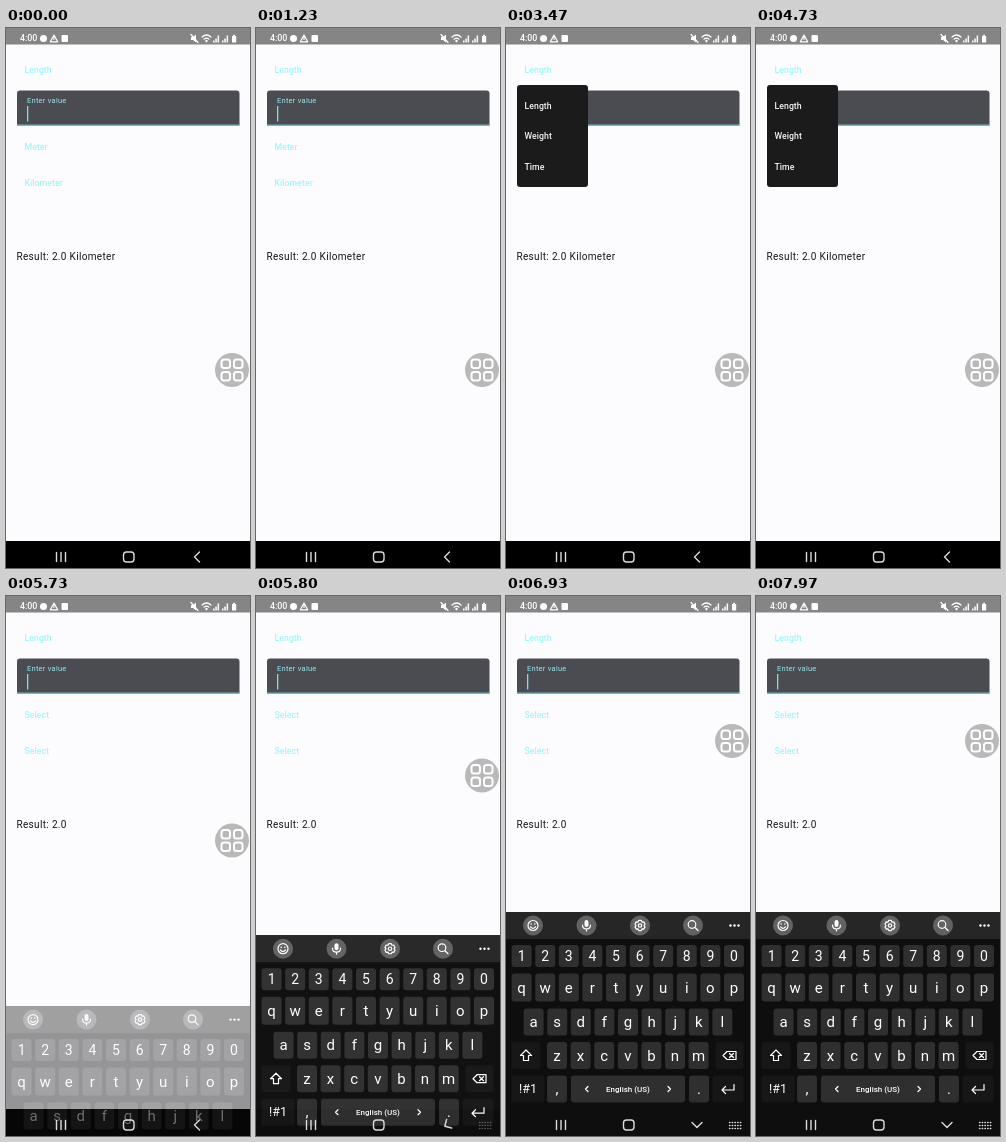
An HTML page that plays this animation: 244x540 px, repeating every 8 s.

```html
<!DOCTYPE html>
<html lang="en">
<head>
<meta charset="utf-8">
<title>Unit converter</title>
<style>
html, body { margin: 0; width: 100%; height: 100%; overflow: hidden; background: #fcfcff; }
svg { display: block; width: 100%; height: 100%; font-family: Roboto, sans-serif; }
.btn { font-size: 8.7px; font-weight: 500; letter-spacing: .06px; fill: #a3f4f8; }
.menu { fill: #f6f6f6; }
.key { fill: #2f2f2f; }
.plain { fill: #171717; }
.mid { text-anchor: middle; fill: #fff; }
.line { fill: none; stroke: #fff; stroke-width: 1.2; stroke-linecap: round; stroke-linejoin: round; }
.nav .line { stroke: #dcdcdc; stroke-width: 1.4; }
</style>
</head>
<body>
<svg viewBox="0 0 244 540">
  <rect width="244" height="540" fill="#fcfcff"/>

  <rect width="244" height="16.5" fill="#858585"/>
  <g fill="#fff">
    <text x="14" y="13.3" font-size="8.8" font-weight="500">4:00</text>
    <circle cx="37.5" cy="10.5" r="3.5"/>
    <path class="line" d="M48 7l3.7 6.8h-7.4zM48 9.5v2"/>
    <rect x="55.5" y="7" width="6.5" height="7" rx="1"/>
    <path d="M185 9h2l3-2.5v8L187 12h-2z"/>
    <path class="line" d="M185 6.5l7 8"/>
    <path class="line" d="M196 9q4.5-4 9 0M198 11.2q2.5-2 5 0"/>
    <circle cx="200.5" cy="13" r="1.2"/>
    <path d="M207 14.5h1.5v-2H207zm2.3 0h1.5v-4h-1.5zm2.3 0h1.5v-7h-1.5zM216 14.5h1.5v-2H216zm2.3 0h1.5v-4h-1.5zm2.3 0h1.5v-7h-1.5z"/>
    <path d="M226 8h1.2V6.8h1.8V8h1.2v6.5H226z"/>
  </g>

  <rect id="ripple" x="11" y="31" width="43" height="23" rx="11.5" fill="#f3f5f8"/>
  <text class="btn" x="18.5" y="45.3">Length</text>
  <path d="M11 97.5V65.5q0-3 3-3H230.5q3 0 3 3V97.5z" fill="#4b4c51"/>
  <path d="M11 97H233.5" stroke="#6cb9c6"/>
  <text x="21" y="75.3" font-size="7.5" letter-spacing=".25" fill="#9be6f0">Enter value</text>
  <rect id="cursor" x="21" y="78" width="1.3" height="15.5" fill="#80deea"/>
  <text class="btn" id="from" x="18.5" y="121.5"></text>
  <text class="btn" id="to" x="18.5" y="157.5"></text>
  <text id="result" x="10.5" y="231.7" font-size="10" letter-spacing=".33" fill="#161616"></text>

  <g id="menu">
    <rect x="11" y="57" width="71" height="102" rx="3" fill="#1b1b1b"/>
    <rect id="pick" x="11" y="62" width="71" height="30" fill="#3a3a3a"/>
    <text class="btn menu" x="18.5" y="81">Length</text>
    <text class="btn menu" x="18.5" y="111">Weight</text>
    <text class="btn menu" x="18.5" y="142">Time</text>
  </g>

  <g id="float">
    <circle r="17" fill="#b9b9ba"/>
    <g id="tiles" fill="none" stroke="#fff" stroke-width="2"></g>
  </g>

  <rect y="513" width="244" height="27" fill="#000"/>
  <g id="board"></g>
  <g class="nav">
    <path class="line" d="M50.5 524.5v9M55 524.5v9M59.5 524.5v9"/>
    <rect class="line" x="117.5" y="524" width="10.5" height="10" rx="3"/>
    <path class="line" id="back" d="M193.5 524l-5 5 5 5"/>
    <path class="line" id="dots" d="M223.5 526.5h12M223.5 529.5h12M223.5 532.5h12" stroke-dasharray=".5 2.2"/>
  </g>
</svg>
<script>
const $ = id => document.getElementById(id);
const PERIOD = 8000, RISE = 5730;
const clamp = x => Math.max(0, Math.min(1, x));
const ramp = (t, a, b) => clamp((t - a) / (b - a));
const show = (id, alpha) => $(id).setAttribute('opacity', +alpha);
const move = (id, value) => $(id).setAttribute('transform', value);

// Keyboard
const key = (x, y, w, h, label = '', size = 15, style = 'key') =>
  `<rect class="${style}" x="${x - w / 2}" y="${y - h / 2}" width="${w}" height="${h}" rx="3"/>` +
  `<text class="mid" x="${x}" y="${y + size * .34}" font-size="${size}">${label}</text>`;
const row = (chars, x, y, h, size) =>
  [...chars].map((c, i) => key(x + i * 23.6, y, 20, h, c, size)).join('');
const side = (x, y, w, label) => key(x, y, w, 27, label, 12.5, 'plain');
const path = (d, x, y) => `<path class="line" transform="translate(${x} ${y})" d="${d}"/>`;
const dot = (x, y, r) => `<circle cx="${x}" cy="${y}" r="${r}" fill="#fff"/>`;
const ring = (x, y, r) => `<circle class="line" cx="${x}" cy="${y}" r="${r}"/>`;

const gear = Array.from({ length: 6 }, (_, i) => {
  const at = (r, a) => `${r * Math.sin(a)} ${-r * Math.cos(a)}`;
  const a = i * Math.PI / 3;
  return `${i ? 'L' : 'M'}${at(5.2, a - .25)}L${at(5.2, a + .25)}L${at(4, a + .52)}`;
}).join('') + 'z';

$('board').innerHTML =
  '<rect y="316" width="244" height="330" fill="#0e0e0e"/>' +
  '<rect y="316" width="244" height="27" fill="#262626"/>' +
  [27, 80.5, 134, 187].map(x => `<circle cx="${x}" cy="329.5" r="10" fill="#626262"/>`).join('') +
  ring(27, 329.5, 5) + dot(25.2, 328, .8) + dot(28.8, 328, .8) + path('M-2.5 1.3q2.5 3 5 0', 27, 329.5) +
  '<rect x="78.5" y="324" width="4" height="7" rx="2" fill="#fff"/>' +
  path('M-4 0q0 4 4 4t4-4M0 4v2', 80.5, 329) +
  path(gear, 134, 329.5) + ring(134, 329.5, 1.7) +
  ring(186, 328.5, 3.8) + path('M0 0l3 3', 189, 331.5) +
  [224.5, 228.5, 232.5].map(x => dot(x, 329.5, 1.2)).join('') +
  row('1234567890', 15.6, 360, 22, 14) +
  row('qwertyuiop', 15.6, 391.5, 28) +
  row('asdfghjkl', 27.6, 426, 27) +
  row('zxcvbnm', 51, 459.5, 27) +
  side(20, 459.5, 29) + path('M0-5.5l5.5 5.5h-3v5h-5v-5h-3z', 20, 459.5) +
  side(223.5, 459.5, 28) + path('M-6.5 0l4-4h9v8h-9zM0-2l4 4M4-2l-4 4', 223.5, 459.5) +
  side(22, 493, 33, '!#1') + key(51, 493, 20, 27, ',') +
  key(122, 493, 114, 27, '<tspan font-weight="500">English (US)</tspan>', 8) +
  path('M1.5-2.5l-2.5 2.5 2.5 2.5', 80.5, 493) + path('M-1.5-2.5l2.5 2.5-2.5 2.5', 163.5, 493) +
  key(193, 493, 20, 27, '.') + side(222, 493, 31) +
  path('M6-4.5v5.5H-6M-2.5-2.5L-6 1l3.5 3.5', 222, 493);

$('tiles').innerHTML = [-10.5, 2].flatMap(x => [-10.5, 2].map(y =>
  `<rect x="${x}" y="${y}" width="8.5" height="8.5" rx="2.5"/>`)).join('');

function draw(t) {
  const reset = t >= 4930;
  $('from').textContent = reset ? 'Select' : 'Meter';
  $('to').textContent = reset ? 'Select' : 'Kilometer';
  $('result').textContent = reset ? 'Result: 2.0' : 'Result: 2.0 Kilometer';

  const lit = t < 5530 ? t % 1000 < 500 : t < 6300 || (t + 200) % 1000 < 500;
  show('cursor', lit);
  show('ripple', ramp(t, 2590, 2690) * (1 - ramp(t, 2870, 3070)));

  const grow = .8 + .2 * (1 - (1 - ramp(t, 2870, 2990)) ** 2);
  move('menu', `translate(11 57) scale(${grow}) translate(-11 -57)`);
  show('menu', ramp(t, 2865, 2900) * (1 - ramp(t, 4990, 5080)));
  show('pick', ramp(t, 4900, 4960));

  // The keyboard and the floating button settle exponentially
  const up = t >= RISE, age = t - RISE;
  move('board', `translate(0 ${up ? 96 * Math.exp(-age / 50) : 300})`);
  show('board', up ? 1 - .6 * Math.exp(-age / 20) : 0);
  move('float', `translate(226 ${up ? 145 + 101 * Math.exp(-age / 66) : 342})`);
  const turn = ramp(t, 5760, 5880);
  move('back', `rotate(${-90 * turn} 191 529)`);
  show('dots', turn);
}

const start = performance.now();
function tick() {
  draw((performance.now() - start) % PERIOD);
  requestAnimationFrame(tick);
}
tick();
</script>
</body>
</html>
```
